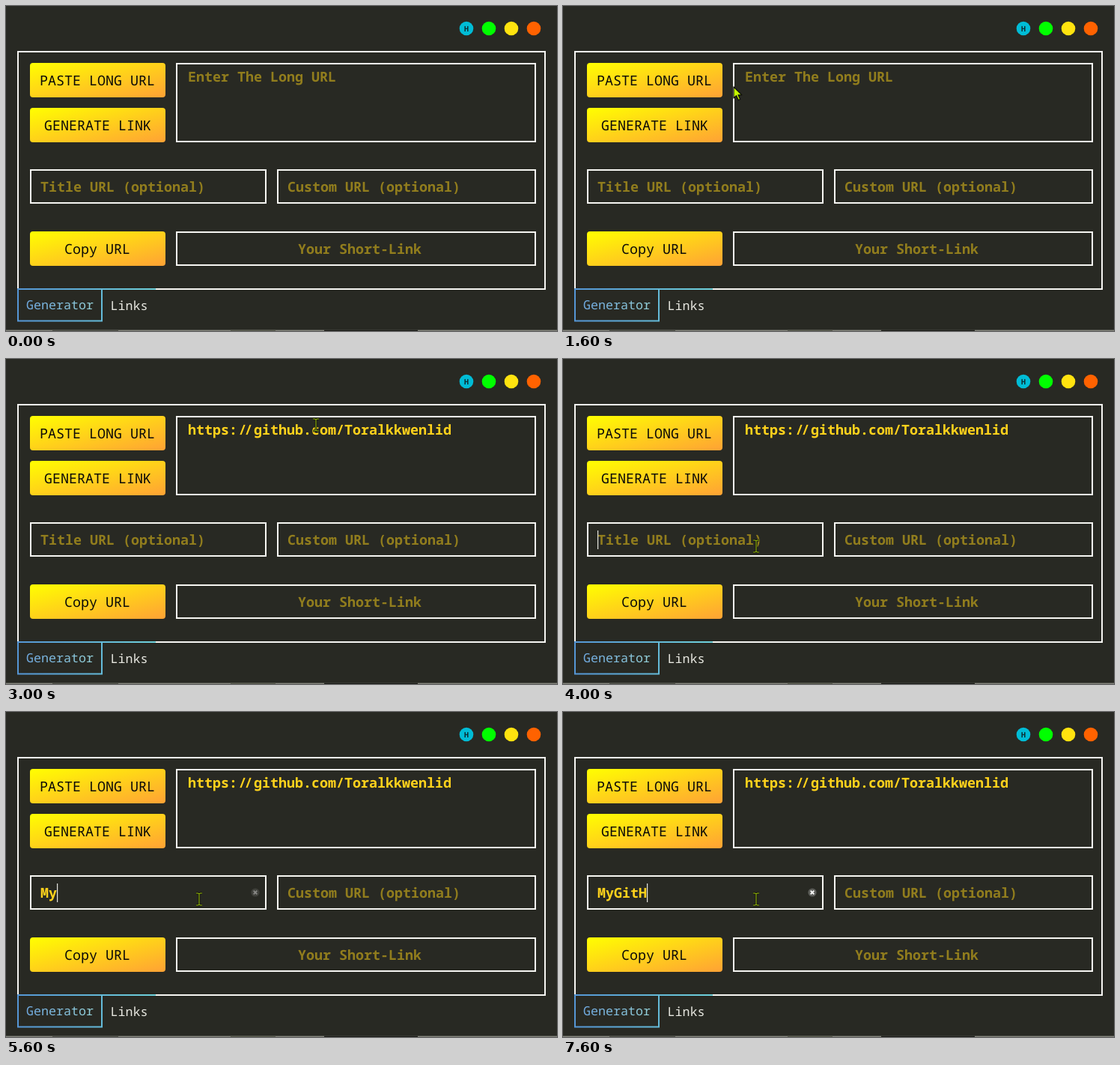
An HTML page for the animation above (8000 ms loop, 736x434 px).

```html
<!DOCTYPE html>
<html lang="en">
<head>
<meta charset="utf-8">
<title>Link shortener</title>
<style>
  html, body { margin: 0; width: 100%; height: 100%; overflow: hidden; background: #282923; }
  svg { display: block; width: 736px; height: 434px; }
  text {
    font: 600 18.333px "Noto Sans Mono", "DejaVu Sans Mono", monospace;
    text-rendering: geometricPrecision;
    white-space: pre;
  }
  .label { font-weight: 400; fill: #0b0b08; }
  .hint { fill: #917d1d; }
  .value { fill: #ffd21c; }
  .tab { font-size: 16.667px; font-weight: 500; }
  .field { fill: none; stroke: #f6f6f2; stroke-width: 2; }
  .line { fill: none; stroke: url(#sky); stroke-width: 2; }
</style>
</head>
<body>
<svg viewBox="0 0 736 434">
  <defs>
    <linearGradient id="gold" x1="0" y1="0" x2="1" y2="1">
      <stop offset="0" stop-color="#ffff00"/>
      <stop offset="1" stop-color="#ffa235"/>
    </linearGradient>
    <linearGradient id="sky" gradientUnits="userSpaceOnUse" x1="15" y1="0" x2="200" y2="0">
      <stop offset="0" stop-color="#5596d6"/>
      <stop offset="1" stop-color="#6fd3dc"/>
    </linearGradient>
    <linearGradient id="tabInk" gradientUnits="userSpaceOnUse" x1="27" y1="0" x2="117" y2="0">
      <stop offset="0" stop-color="#6fa9e0"/>
      <stop offset="1" stop-color="#93d0d8"/>
    </linearGradient>
  </defs>
  <rect width="736" height="434" fill="#282923"/>
  <g id="ui"></g>

  <text id="url" class="value" y="101"></text>
  <text id="title" class="value" x="46" y="248"></text>
  <rect id="caret" y="229" width="1.2" height="25" fill="#e4e4de"/>

  <g id="clear" transform="translate(333 241)">
    <circle r="5.6" fill="#5d5e5a"/>
    <path d="M-2.3-2.3 2.3 2.3M2.3-2.3-2.3 2.3" stroke="#fff" stroke-width="1.8"/>
  </g>

  <path id="arrow" d="M0 0V15L3.5 11.7 6.3 17.6 8.7 16.5 6 10.8H10.8Z"
        fill="#c6ff00" stroke="#11120c" stroke-width="1.3" stroke-linejoin="round"/>
  <g id="beam" fill="none">
    <path d="M-4-8H-1.5L0-7 1.5-8H4M-4 8H-1.5L0 7 1.5 8H4M0-7V7" stroke="#15160f" stroke-width="3"/>
    <path d="M-4-8H-1.5L0-7 1.5-8H4M-4 8H-1.5L0 7 1.5 8H4M0-7V7" stroke="#93b80a" stroke-width="1.1"/>
  </g>
</svg>
<script>
const LOOP = 8000, TICK = 200, CHAR = 11;
const $ = id => document.getElementById(id);

const button = (y, x, label) =>
  `<rect x="32" y="${y}" width="181" height="46" rx="4" fill="url(#gold)"/>
   <text class="label" x="${x}" y="${y + 30}">${label}</text>`;
const field = (x, y, w, h) =>
  `<rect class="field" x="${x + 1}" y="${y + 1}" width="${w - 2}" height="${h - 2}"/>`;
const hint = (x, y, label, id = "") =>
  `<text class="hint" id="${id}" x="${x}" y="${y}">${label}</text>`;
const strip = (x, w, fill) =>
  `<rect x="${x}" y="432.6" width="${w}" height="1.4" fill="${fill}"/>`;

$("ui").innerHTML = [
  ...["#00bcd6", "#00ff00", "#ffe30f", "#ff6200"].map((c, i) =>
    `<circle cx="${615 + i * 30}" cy="30" r="9.3" fill="${c}"/>`),
  `<text x="615" y="33.8" text-anchor="middle" style="font-size:10px;font-weight:700" fill="#0d2a30">H</text>`,
  field(15, 60, 706, 319),
  button(76, 45, "PASTE LONG URL"),
  button(136, 51, "GENERATE LINK"),
  button(301, 78, "Copy URL"),
  field(227, 76, 481, 106),
  field(32, 218, 316, 46),
  field(362, 218, 346, 46),
  field(227, 301, 481, 46),
  hint(243, 101, "Enter The Long URL", "urlHint"),
  hint(46, 248, "Title URL (optional)", "titleHint"),
  hint(376, 248, "Custom URL (optional)"),
  hint(390, 331, "Your Short-Link"),
  `<path class="line" d="M15 378H200M16 378V420.5H128V378"/>`,
  `<text class="tab" x="27" y="405" fill="url(#tabInk)">Generator</text>`,
  `<text class="tab" x="139.5" y="406" fill="#e9e9e2">Links</text>`,
  strip(0, 736, "#85867e"), strip(62, 88, "#4b4d45"),
  strip(300, 60, "#55574b"), strip(425, 125, "#191a16")
].join("");

// The two slashes sit closer together than their cells
const address = "https://github.com/Toralkkwenlid";
$("url").textContent = address;
$("url").setAttribute("x", [...address].map((_, i) =>
  243 + i * CHAR + (i === 6 ? 1.5 : i === 7 ? -1.5 : 0)).join(" "));

// time, x, y
const arrowPath = [
  [200, 40, 416], [400, 98, 290], [600, 153, 188], [1000, 205, 143],
  [1200, 236, 124], [1600, 228, 108], [2000, 172, 104], [2800, 172, 104]
];
const beamPath = [[3000, 414, 88], [3200, 400, 104], [3600, 318, 190], [4000, 258, 250]];
const typed = [[0, ""], [5600, "My"], [6400, "MyG"], [6800, "MyGit"], [7600, "MyGitH"]];
const caretOn = [[0, 0], [3800, 1], [4600, 0], [5200, 1], [6200, 0], [6400, 1]];

const held = (steps, t) => steps.filter(s => s[0] <= t).pop()[1];

function along(path, t) {
  const i = path.findIndex(p => p[0] > t);
  if (i < 0) return path[path.length - 1].slice(1);
  if (i === 0) return path[0].slice(1);
  const [t0, x0, y0] = path[i - 1], [t1, x1, y1] = path[i];
  const k = (t - t0) / (t1 - t0);
  return [x0 + (x1 - x0) * k, y0 + (y1 - y0) * k];
}

const show = (id, on) => $(id).setAttribute("opacity", +on);
const place = (id, path, t) =>
  $(id).setAttribute("transform", `translate(${along(path, t).join(" ")})`);

function draw(now) {
  const t = Math.floor((now % LOOP) / TICK) * TICK;
  const text = held(typed, t), pasted = t >= 2200;

  show("url", pasted);
  show("urlHint", !pasted);
  show("titleHint", !text);
  $("title").textContent = text;
  $("caret").setAttribute("x", 46 + text.length * CHAR);
  show("caret", held(caretOn, t));
  show("clear", t < 5600 ? 0 : t < 5800 ? 0.45 : 1);

  show("arrow", t >= 200 && t < 3000);
  show("beam", t >= 3000);
  place("arrow", arrowPath, t);
  place("beam", beamPath, t);
}

const start = performance.now();
function frame() {
  draw(performance.now() - start);
  requestAnimationFrame(frame);
}
frame();
</script>
</body>
</html>
```
